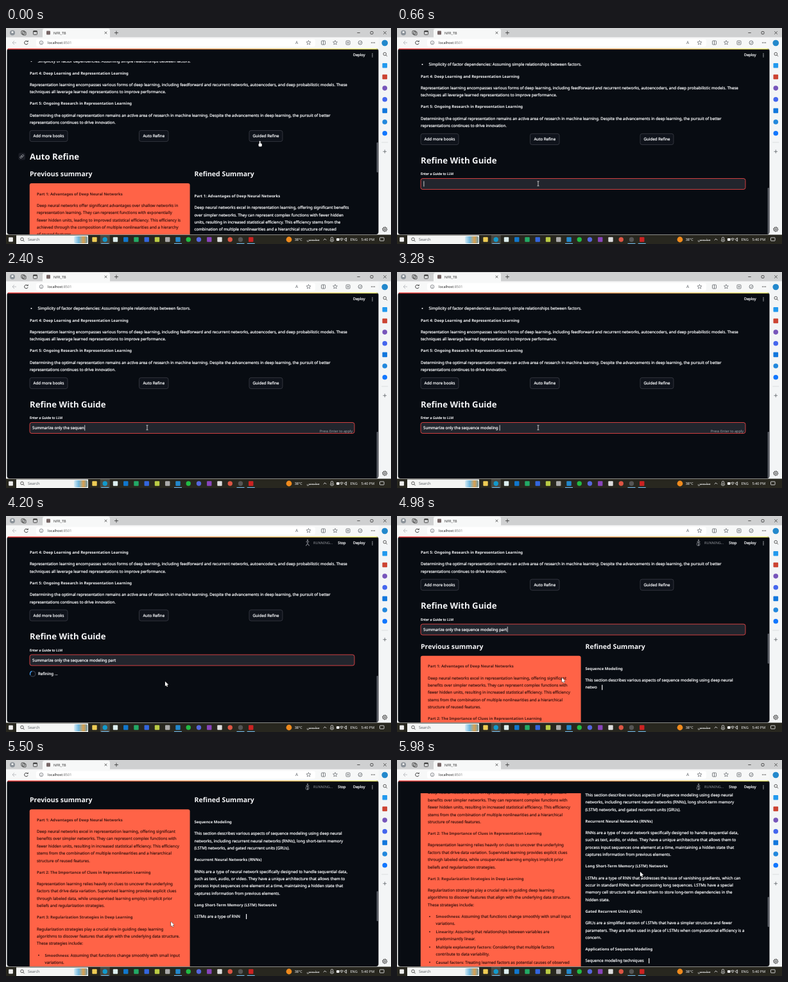
These frames come from a looping animation (600x338 px, 6000 ms). An HTML page with a canvas:

```html
<!DOCTYPE html>
<html lang="en">
<head>
<meta charset="utf-8">
<title>Guided summary</title>
<style>
html, body { margin: 0; width: 100%; height: 100%; overflow: hidden; background: #080c12; }
canvas { display: block; width: 600px; height: 338px; }
</style>
</head>
<body>
<canvas id="stage"></canvas>
<script>
const LOOP = 6000, LINE = 11.4, PARA = 18.2, ITEM = 12.5;
const SANS = '"Noto Sans", "Open Sans", sans-serif';
const PAGE = '#080c12', LIGHT = '#f4f5f7', INK = '#4a1913', GREY = '#5c6166', DARK = '#333', RED = '#ff4b4b';
const SWAP = 200, FOCUS = 600, ENTER = 3760, RESULT = 4860;
const GUIDE = 'Summarize only the sequence modeling part';

const OPENING = [
  '#Part 4: Deep Learning and Representation Learning',
  'Representation learning encompasses various forms of deep learning, including feedforward and recurrent networks, autoencoders, and deep probabilistic models. These|techniques all leverage learned representations to improve performance.',
  '#Part 5: Ongoing Research in Representation Learning',
  'Determining the optimal representation remains an active area of research in machine learning. Despite the advancements in deep learning, the pursuit of better|representations continues to drive innovation.'
];
const OLD_LEFT = [
  '#Part 1: Advantages of Deep Neural Networks',
  'Deep neural networks offer significant advantages over shallow networks in|representation learning. They can represent functions with exponentially|fewer hidden units, leading to improved statistical efficiency. This efficiency is|achieved through the composition of multiple nonlinearities and a hierarchy|of reused features.'
];
const OLD_RIGHT = [
  '#Part 1: Advantages of Deep Neural Networks',
  'Deep neural networks excel in representation learning, offering significant benefits|over simpler networks. They can represent complex functions with fewer hidden|units, resulting in increased statistical efficiency. This efficiency stems from the|combination of multiple nonlinearities and a hierarchical structure of reused|features.'
];
const NEW_LEFT = [
  '#Part 1: Advantages of Deep Neural Networks',
  'Deep neural networks excel in representation learning, offering significant|benefits over simpler networks. They can represent complex functions with|fewer hidden units, resulting in increased statistical efficiency. This efficiency|stems from the combination of multiple nonlinearities and a hierarchical|structure of reused features.',
  '#Part 2: The Importance of Clues in Representation Learning',
  'Representation learning relies heavily on clues to uncover the underlying|factors that drive data variation. Supervised learning provides explicit clues|through labeled data, while unsupervised learning employs implicit prior|beliefs and regularization strategies.',
  '#Part 3: Regularization Strategies in Deep Learning',
  'Regularization strategies play a crucial role in guiding deep learning|algorithms to discover features that align with the underlying data structure.|These strategies include:',
  '*Smoothness:~ Assuming that functions change smoothly with small input|variations.',
  '*Linearity:~ Assuming that relationships between variables are|predominantly linear.',
  '*Multiple explanatory factors:~ Considering that multiple factors|contribute to data variability.',
  '*Causal factors:~ Treating learned factors as potential causes of observed|data.'
];
const NEW_RIGHT = [
  '#Sequence Modeling',
  'This section describes various aspects of sequence modeling using deep neural|networks, including recurrent neural networks (RNNs), long short-term memory|(LSTM) networks, and gated recurrent units (GRUs).',
  '#Recurrent Neural Networks (RNNs)',
  'RNNs are a type of neural network specifically designed to handle sequential data,|such as text, audio, or video. They have a unique architecture that allows them to|process input sequences one element at a time, maintaining a hidden state that|captures information from previous elements.',
  '#Long Short-Term Memory (LSTM) Networks',
  'LSTMs are a type of RNN that addresses the issue of vanishing gradients, which can|occur in standard RNNs when processing long sequences. LSTMs have a special|memory cell structure that allows them to store long-term dependencies in the|hidden state.',
  '#Gated Recurrent Units (GRUs)',
  'GRUs are a simplified version of LSTMs that have a simpler structure and fewer|parameters. They are often used in place of LSTMs when computational efficiency is a|concern.',
  '#Applications of Sequence Modeling',
  'Sequence modeling techniques'
];
const FLOW = NEW_RIGHT.join('').replace(/[#|]/g, '');
const upTo = s => FLOW.indexOf(s) + s.length;

const canvas = document.getElementById('stage');
const dpr = window.devicePixelRatio || 1;
canvas.width = 600 * dpr;
canvas.height = 338 * dpr;
const c = canvas.getContext('2d');
c.scale(dpr, dpr);
c.textRendering = 'geometricPrecision';
c.lineJoin = 'round';

// Motion
const ramp = (t, from, to) => Math.min(1, Math.max(0, (t - from) / (to - from)));
const ease = (t, from, to) => {
  const p = ramp(t, from, to);
  return p * p * (3 - 2 * p);
};
const scroll = t => -18.5 - 161.5 * ease(t, 4880, 5160) - 28 * ease(t, 5340, 5460) - 60.5 * ease(t, 5560, 5960);
const typedCount = t => Math.floor(15 * ramp(t, 640, 1500) + 22 * ramp(t, 1640, 3220) + 4 * ramp(t, 3340, 3600));
function streamed(t) {
  const a = upTo('sequential data,'), b = upTo('type of RNN');
  return Math.round(a * ramp(t, 4880, 5220) + (b - a) * ramp(t, 5220, 5500) + (FLOW.length - b) * ramp(t, 5500, 5960));
}
function pointer(t) {
  const toField = ease(t, 240, 560), away = ease(t, 3660, 4060), rest = ease(t, 4500, 4900), up = ease(t, 5600, 5900);
  return [396 - 176 * toField + 28 * away + 9 * rest + 122 * up, 181 + 62.5 * toField + 15.5 * away - 6 * rest - 78 * up];
}

// Drawing helpers
function text(s, x, y, size = 6.2, color = LIGHT, weight = 500, align = 'left') {
  c.font = `${weight} ${size}px ${SANS}`;
  c.fillStyle = c.strokeStyle = color;
  c.textAlign = align;
  c.fillText(s, x, y + size * 0.35);
  if (weight === 500) {
    c.lineWidth = 0.22;
    c.strokeText(s, x, y + size * 0.35);
  }
  return c.measureText(s).width;
}
const bold = (s, x, y, color, size = 6) => text(s, x, y, size, color, 700);
const small = (s, x, y, color, align) => text(s, x, y, 5.5, color, 400, align);

function paint(fill, stroke, w = 0.8) {
  if (fill) { c.fillStyle = fill; c.fill(); }
  if (stroke) { c.strokeStyle = stroke; c.lineWidth = w; c.stroke(); }
}
function rect(x, y, w, h, fill, r = 0, stroke) {
  c.beginPath();
  c.roundRect(x, y, w, h, r);
  paint(fill, stroke);
}
function disc(x, y, r, fill) {
  c.beginPath();
  c.arc(x, y, r, 0, 7);
  paint(fill);
}
function ring(x, y, r, color, w, from = 0, to = 7) {
  c.beginPath();
  c.arc(x, y, r, from, to);
  paint(null, color, w);
}
// Each path is a flat list of x, y pairs relative to the origin.
function lines(x, y, color, w, ...paths) {
  c.beginPath();
  for (const p of paths)
    for (let i = 0; i < p.length; i += 2) c[i ? 'lineTo' : 'moveTo'](x + p[i], y + p[i + 1]);
  paint(null, color, w);
}
const plus = (x, y, r, color) => lines(x, y, color, 0.8, [-r, 0, r, 0], [0, -r, 0, r]);
const cross = (x, y, r, color) => lines(x, y, color, 0.8, [-r, -r, r, r], [r, -r, -r, r]);
const square = (x, y, r, color) => rect(x - r, y - r, 2 * r, 2 * r, null, 1, color);
function dots(x, y, dx, dy, color) {
  for (const k of [-1, 0, 1]) disc(x + k * dx, y + k * dy, 0.7, color);
}
function magnifier(x, y) {
  ring(x, y - 0.5, 2.3, DARK);
  lines(x, y, DARK, 0.9, [1.7, 1.2, 3.6, 3.2]);
}
function star(x, y, r) {
  const p = [];
  for (let i = 0; i <= 10; i++) {
    const a = i * Math.PI / 5, q = i % 2 ? r * 0.45 : r;
    p.push(Math.sin(a) * q, -Math.cos(a) * q);
  }
  lines(x, y, GREY, 0.7, p);
}
// A colour ending in "o" gives a disc, otherwise a square.
function badge(code, x, y, r) {
  const color = code.slice(0, 4);
  if (code.endsWith('o')) disc(x, y, r, color);
  else rect(x - r, y - r, 2 * r, 2 * r, color, 1);
}

// Page
function prose(blocks, x, y, color, limit = Infinity) {
  let left = limit, wasItem = false;
  for (const block of blocks) {
    const head = block[0] === '#', item = block[0] === '*';
    if (item && wasItem) y -= PARA - ITEM;
    wasItem = item;
    const rows = block.replace(/^[#*]/, '').split('|');
    rows.forEach((row, i) => {
      if (left <= 0) return;
      const part = row.slice(0, left), rowX = item ? x + ITEM : x;
      let w = 0;
      if (item && !i) {
        disc(x + 3, y, 1, color);
        const [term, rest] = part.split('~');
        text(rest, rowX + bold(term, rowX, y, color), y, 6.2, color);
      } else {
        w = head ? bold(part, rowX, y, color) : text(part, rowX, y, 6.2, color);
      }
      left -= row.length;
      if (left <= 0) rect(rowX + w + 7.5, y - 4, 1.2, 8, LIGHT);
      y += i < rows.length - 1 ? LINE : PARA;
    });
  }
}
function button(label, x, y, w) {
  rect(x, y - 8.6, w, 17.2, '#0f131b', 3, '#3b3e47');
  text(label, x + w / 2, y, 6.2, LIGHT, 500, 'center');
}
function summaries(y, left, right, limit) {
  bold('Previous summary', 37, y, LIGHT, 10.5);
  bold('Refined Summary', 293.5, y, LIGHT, 10.5);
  rect(36.8, y + 14.6, 249.8, 420, '#ff6347', 3);
  prose(left, 48, y + 31, INK);
  prose(right, 293.5, y + 34.4, LIGHT, limit);
}
function guideForm(y, t) {
  const focused = t > FOCUS, running = t >= ENTER;
  bold('Refine With Guide', 37, y + 207, LIGHT, 13.2);
  text('Enter a Guide to LLM', 37, y + 228.2, 5.2);
  rect(37, y + 235.5, 506, 17, '#22252d', 3, focused && RED);
  const typed = GUIDE.slice(0, typedCount(t));
  const w = text(typed, 41, y + 244);
  if (focused && (!running || t > RESULT)) rect(41.5 + w, y + 239.6, 0.8, 8.6, LIGHT);
  if (typed && !running) small('Press Enter to apply', 540, y + 249, '#a0a2a8', 'right');
}
function anchor(x, y) {
  rect(x - 5.2, y - 5.5, 10.5, 11, '#1a1d25', 2);
  c.save();
  c.translate(x, y);
  c.rotate(-0.7);
  for (const dx of [-3.4, -0.2]) rect(dx, -1.3, 3.6, 2.6, null, 1.3, '#a9abb0');
  c.restore();
}
function page(t) {
  const y = t < SWAP ? -5 : t < ENTER ? 0 : scroll(t);
  disc(39.5, y + 57, 1, LIGHT);
  text('Simplicity of factor dependencies: Assuming simple relationships between factors.', 49.5, y + 57);
  prose(OPENING, 37, y + 75.5, LIGHT);
  button('Add more books', 37, y + 174, 59);
  button('Auto Refine', 207.5, y + 174, 45.5);
  button('Guided Refine', 379, y + 174, 52);
  if (t < SWAP) {
    anchor(24.7, y + 206);
    bold('Auto Refine', 37, y + 206, LIGHT, 13.2);
    summaries(y + 233.5, OLD_LEFT, OLD_RIGHT);
    return;
  }
  guideForm(y, t);
  if (t >= RESULT) summaries(y + 270.6, NEW_LEFT, NEW_RIGHT, streamed(t));
  else if (t >= ENTER) {
    const a = t / 90;
    ring(41.7, y + 265.5, 4.2, '#343a47', 1.3);
    ring(41.7, y + 265.5, 4.2, '#3d9df3', 1.3, a, a + 1.7);
    text('Refining ...', 50, y + 265.5);
  }
}

// Cycles between running, standing with arms out, and sitting on a wheel.
function athlete(x, y, pose) {
  const grey = '#777a81', swing = [2.6, 1.3, 0.6][pose], arm = pose === 1 ? 4 : 2.4;
  disc(x, y - 4, 1.2, grey);
  lines(x, y, grey, 1.2, [0, -2, 0, 1], [-arm, -1.6, arm, -1.6], [-swing, 4.6, 0, 1, swing, 4.6]);
  if (pose === 2) ring(x - 0.4, y + 2, 2.6, grey);
}
function status(t) {
  if (t >= ENTER) {
    athlete(470, 42, Math.floor((t - ENTER) / 160 + 1) % 3);
    small('RUNNING...', 479, 42.5, '#92959b');
    text('Stop', 517.3, 42.5, 5.7);
  }
  text('Deploy', 541, 42.5, 5.7);
  dots(571, 42.5, 0, 2.4, LIGHT);
}
function scrollbar(t) {
  const result = t >= RESULT, form = t >= SWAP && !result;
  const top = result ? 174 - scroll(t) * 0.15 : form ? 250 : 179;
  rect(577.6, top, 2.6, form ? 72.5 : 47, '#5b5e66', 1.3);
}

// Browser and desktop
function browser() {
  rect(0, 0, 600, 15, '#cfd0d1');
  rect(0, 14.5, 600, 18, '#f7f8f8');
  rect(57, 1, 105, 16, '#f7f8f8', 3);
  disc(10, 7.5, 4, '#8b9299');
  disc(10, 6.5, 1.6, '#f2f2f2');
  square(26.5, 7, 2.6, DARK);
  square(28.5, 8.5, 2.6, DARK);
  square(45.5, 7.5, 3, DARK);
  rect(42.5, 4.5, 6, 1.6, DARK);
  badge('#766', 66, 7.5, 3);
  small('NFR_TB', 74, 7.8, DARK);
  cross(155.5, 7.5, 1.8, DARK);
  plus(172, 7.5, 3, DARK);
  lines(549.5, 7.5, DARK, 0.8, [-2.2, 0, 2.2, 0]);
  square(570, 7.5, 2, DARK);
  cross(590.5, 7.5, 2.2, DARK);

  rect(47, 17.3, 435, 12, '#fff', 3);
  lines(13, 23, '#b0b4b8', 0.8, [-3, 0, 3, 0], [0, -3, -3, 0, 0, 3]);
  ring(31.5, 23, 2.8, DARK, 0.9, 0.3, 5.6);
  lines(31.5, 23, DARK, 0.9, [0.8, -1.8, 2.8, -1.6, 2.8, -3.4]);
  ring(55, 23, 2.8, GREY, 0.7);
  lines(55, 23, GREY, 0.8, [0, -0.5, 0, 1.6]);
  small(':8501', 65 + small('localhost', 65, 23, '#222'), 23, '#777');
  text('A', 453, 23, 6.5, GREY, 400, 'center');
  star(471.5, 23, 3.6);
  square(494.5, 23, 3, GREY);
  lines(494.5, 23, GREY, 0.8, [0, -3, 0, 3]);
  star(513, 23, 3.6);
  square(533, 23, 3, GREY);
  plus(533, 23, 1.5, GREY);
  ring(552, 23, 3, GREY);
  lines(552, 23, GREY, 0.8, [-1.5, 0, -0.3, 1.2, 1.8, -1.2]);
  dots(572, 23, 2.3, 0, DARK);
}

const TOOLS = '#28co - #29e #c43 #75bo #46eo #17d #28do #17fo'.split(' ');
function sidebar() {
  const x = 590.3;
  rect(580.5, 15, 19.5, 309, '#f3f5f6');
  TOOLS.forEach((code, i) => {
    const y = 23.5 + 17.65 * i;
    if (code === '-') magnifier(x, y);
    else badge(code, x, y, i ? 3.8 : 4.8);
  });
  lines(x, 179, '#cfd3d6', 0.7, [-5, 0, 5, 0]);
  plus(x, 193.3, 2.8, GREY);
  ring(x, 315, 1.2, DARK);
  ring(x, 315, 3, DARK);
  for (let a = 0; a < 6; a += Math.PI / 4) ring(x, 315, 3.7, DARK, 0.9, a, a + 0.35);
}

// "_" marks an open window.
const APPS = '#ec5 #19c_o #dee #17c #2a6 #36d #bc4 #aaa #28c_ #2b4o #56do #84b #ddd #d54o #555_o #c22_'.split(' ');
function taskbar() {
  rect(0, 323.5, 600, 14.5, '#28271f');
  badge('#eee', 7.5, 331, 3.4);
  rect(16, 324.6, 112, 13.4, '#f4f5f4');
  magnifier(25, 331);
  text('Search', 34, 331.2, 5.9, GREY, 400);
  const g = c.createLinearGradient(106, 0, 128, 0);
  ['#d5ecf6', '#6fb6dd', '#d9a04f', '#5f9bb9'].forEach((color, i) => g.addColorStop(i / 3, color));
  rect(106, 326, 21, 11, g, 2);
  APPS.forEach((code, i) => {
    const x = 138 + 16.25 * i;
    if (i === 1) rect(x - 7.5, 324, 15, 14, '#4a4942');
    badge(code, x, 331, 3.7);
    if (code.includes('_')) rect(x - 6, 336.8, 12, 1.2, '#6fb3e0');
  });
  disc(441, 331, 4.4, '#ef8a1d');
  small('38°C', 449.7, 331.2, LIGHT);
  text('مشمس', 487, 330.5, 6.2, LIGHT, 400, 'right');
  lines(497, 331, LIGHT, 0.8, [-2.3, 1.1, 0, -1.2, 2.3, 1.1]);
  rect(506.5, 327.5, 3, 4.6, null, 1, LIGHT);
  ring(508, 331.5, 2.8, LIGHT, 0.7, 0, Math.PI);
  rect(515, 329, 4.5, 4, LIGHT, 0.8);
  for (const r of [1.4, 3, 4.6]) ring(523, 333.7, r, LIGHT, 0.7, -2.3, -0.8);
  lines(528, 331, LIGHT, 0.8, [0, -1, 2.6, -2.5, 2.6, 2.5, 0, 1, 0, -1]);
  small('ENG', 536.5, 331.2, LIGHT);
  small('5:40 PM', 553.5, 331.2, LIGHT);
  rect(582.5, 328, 6.6, 5, null, 0.6, LIGHT);
}

function mouse(t) {
  const [x, y] = pointer(t);
  if (t > 500 && t < 3720) {
    lines(x, y, '#e8e8e8', 0.8, [-1.5, -3.5, 1.5, -3.5], [0, -3.5, 0, 3.5], [-1.5, 3.5, 1.5, 3.5]);
  } else if (t < 300) {
    rect(x - 2.4, y - 0.6, 5.2, 5.2, '#fff', 1.6);
    rect(x - 1.1, y - 4.2, 1.6, 6, '#fff', 0.8);
  } else {
    lines(x, y, '#222', 0.9, [0, 0, 0, 7.2, 1.7, 5.7, 2.8, 8.2, 4, 7.6, 2.9, 5.2, 5.1, 5, 0, 0]);
    paint('#fff');
  }
}

function draw(t) {
  rect(0, 0, 600, 338, '#f3f5f6');
  browser();
  sidebar();
  c.save();
  c.beginPath();
  c.roundRect(1.5, 32, 579, 291, 4);
  c.clip();
  rect(0, 30, 600, 300, PAGE);
  c.save();
  c.beginPath();
  c.rect(0, 52, 600, 290);
  c.clip();
  page(t);
  c.restore();
  const g = c.createLinearGradient(1, 0, 580, 0);
  g.addColorStop(0, RED);
  g.addColorStop(1, '#fffd80');
  rect(0, 32, 600, 1.5, g);
  status(t);
  scrollbar(t);
  c.restore();
  taskbar();
  mouse(t);
}

const start = performance.now();
function tick() {
  draw((performance.now() - start) % LOOP);
  requestAnimationFrame(tick);
}
tick();
</script>
</body>
</html>
```
